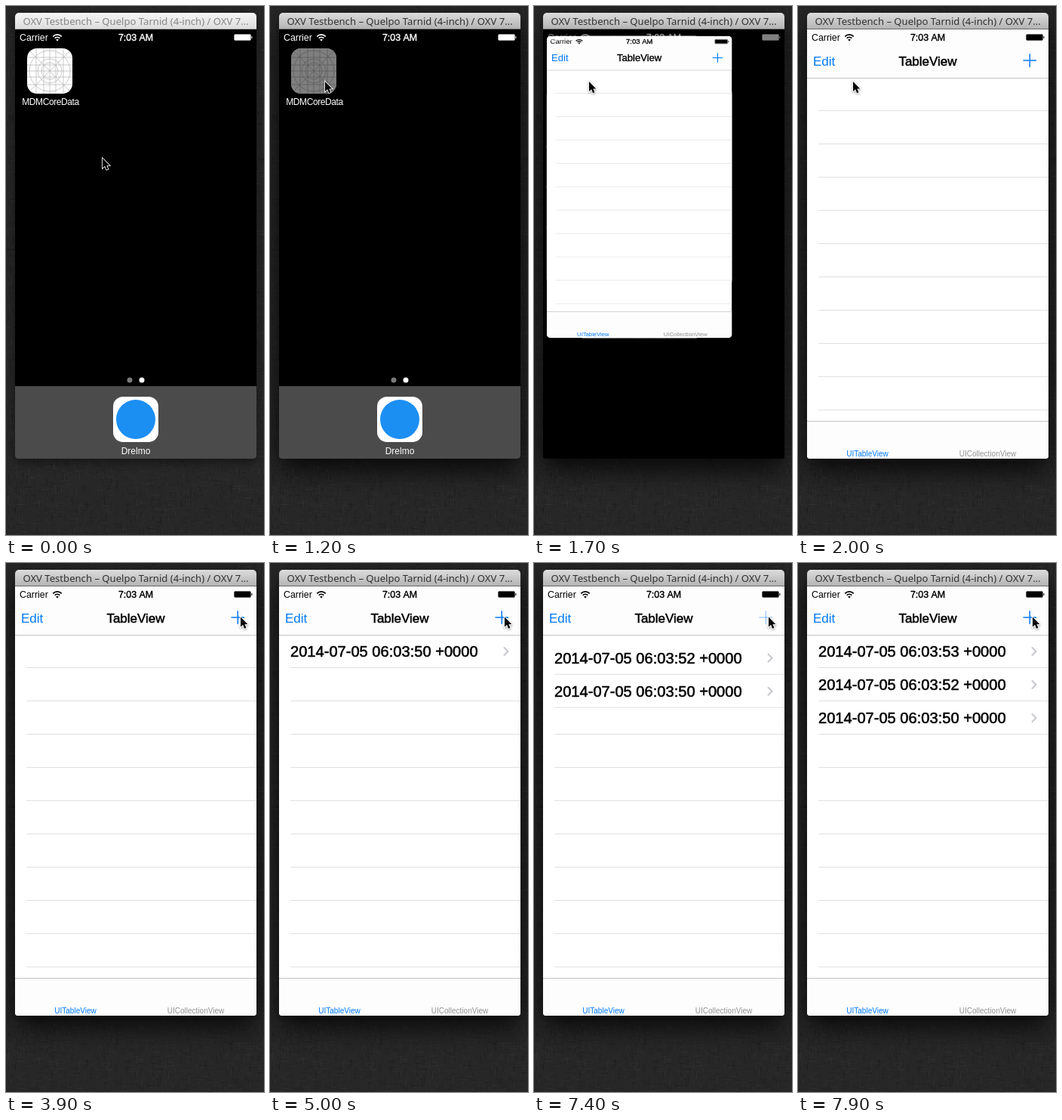
These frames come from a looping animation (342 px wide and 700 px high, 8 s). An HTML page with a canvas:

```html
<!DOCTYPE html>
<html lang="en">
<head>
<meta charset="utf-8">
<title>Table view demo</title>
<style>
html, body { margin: 0; width: 100%; height: 100%; overflow: hidden; background: #262626; }
canvas { display: block; }
</style>
</head>
<body>
<canvas id="stage" width="342" height="700"></canvas>
<script>
const LOOP = 8000, STEP = 100;
const SCREEN = { x: 12, y: 31, w: 320, h: 568 };
const ICON = { x: 28, y: 56, w: 60, h: 60 };
const ACTIVATE = 1200;
const TAPS = [
  { t: 4100, sec: 50 },
  { t: 5500, sec: 52 },
  { t: 7100, sec: 53 }
];
const BLUE = '#007aff', RULE = '#e0e0e0';
const SANS = '"Liberation Sans", Arial, sans-serif';

const ctx = document.getElementById('stage').getContext('2d');

const lerp = (a, b, p) => a + (b - a) * p;
const ramp = (t, from, to) => Math.min(1, Math.max(0, (t - from) / (to - from)));
const smooth = p => p * p * (3 - 2 * p);
const easeInOut = p => p < 0.5 ? 4 * p ** 3 : 1 - 4 * (1 - p) ** 3;

function rect(x, y, w, h, color) {
  ctx.fillStyle = color;
  ctx.fillRect(x, y, w, h);
}

function roundPath(x, y, w, h, r) {
  ctx.beginPath();
  ctx.roundRect(x, y, w, h, r);
}

function roundRect(x, y, w, h, r, color) {
  roundPath(x, y, w, h, r);
  ctx.fillStyle = color;
  ctx.fill();
}

function disc(x, y, r, color) {
  ctx.fillStyle = color;
  ctx.beginPath();
  ctx.arc(x, y, r, 0, Math.PI * 2);
  ctx.fill();
}

// weight adds a thin outline, for a medium cut of the regular face
function text(str, x, y, size, color, { align = 'left', weight = 0, font = SANS, track = 0 } = {}) {
  ctx.font = `${size}px ${font}`;
  ctx.textAlign = align;
  ctx.letterSpacing = track + 'px';
  ctx.fillStyle = color;
  ctx.fillText(str, x, y);
  if (weight) {
    ctx.strokeStyle = color;
    ctx.lineWidth = weight;
    ctx.lineJoin = 'round';
    ctx.strokeText(str, x, y);
  }
}

function withAlpha(alpha, draw) {
  if (alpha <= 0) return;
  ctx.save();
  ctx.globalAlpha *= alpha;
  draw();
  ctx.restore();
}

function makeLinen() {
  const c = document.createElement('canvas');
  c.width = 342;
  c.height = 700;
  const g = c.getContext('2d');
  let seed = 7;
  const rnd = () => (seed = (seed * 16807) % 2147483647) / 2147483647;
  g.fillStyle = '#272727';
  g.fillRect(0, 0, 342, 700);
  for (let i = 0; i < 9000; i++) {
    const len = 2 + rnd() * 9, upright = rnd() < 0.5;
    g.fillStyle = rnd() < 0.55 ? 'rgba(0,0,0,.11)' : 'rgba(255,255,255,.025)';
    g.fillRect(Math.floor(rnd() * 342), Math.floor(rnd() * 700), upright ? 1 : len, upright ? len : 1);
  }
  return c;
}
const linen = makeLinen();

function drawWindow(active) {
  ctx.drawImage(linen, 0, 0);
  ctx.save();
  ctx.shadowColor = active ? 'rgba(0,0,0,.85)' : 'rgba(0,0,0,.5)';
  ctx.shadowBlur = active ? 36 : 16;
  ctx.shadowOffsetY = active ? 14 : 5;
  roundRect(12, 9, 320, 590, [5, 5, 4, 4], '#000');
  ctx.restore();

  const grad = ctx.createLinearGradient(0, 9, 0, 31);
  grad.addColorStop(0, active ? '#dcdcdc' : '#f6f6f6');
  grad.addColorStop(1, active ? '#b2b2b2' : '#dcdcdc');
  roundRect(12, 9, 320, 22, [5, 5, 0, 0], grad);
  rect(12, 30, 320, 1, active ? '#6a6a6a' : '#a0a0a0');
  text('OXV Testbench – Quelpo Tarnid (4-inch) / OXV 7…', 172, 25, 13.1,
    active ? '#303030' : '#858585',
    { align: 'center', font: '"Noto Sans", "Open Sans", sans-serif' });
}

function drawStatus(color) {
  text('Carrier', 18, 45.5, 12.4, color);
  text('7:03 AM', 172, 45.5, 12.4, color, { align: 'center', weight: 0.4 });
  ctx.strokeStyle = color;
  ctx.lineWidth = 1.8;
  for (const r of [4.7, 8.1]) {
    ctx.beginPath();
    ctx.arc(68, 46, r, -Math.PI * 0.75, -Math.PI * 0.25);
    ctx.stroke();
  }
  ctx.fillStyle = color;
  ctx.beginPath();
  ctx.moveTo(68, 46.5);
  ctx.arc(68, 46, 2.2, -Math.PI * 0.8, -Math.PI * 0.2);
  ctx.fill();
  rect(303, 38, 21, 7, color);
  withAlpha(0.6, () => {
    ctx.lineWidth = 1;
    roundPath(302.5, 37.5, 22, 8, 1.5);
    ctx.stroke();
    rect(325, 40, 1.6, 3, color);
  });
}

function drawGridIcon() {
  const { x, y, w } = ICON, cx = x + w / 2, cy = y + w / 2;
  ctx.save();
  roundPath(x, y, w, w, 13);
  ctx.clip();
  rect(x, y, w, w, '#fff');
  ctx.strokeStyle = '#b4b4b4';
  ctx.lineWidth = 0.7;
  ctx.beginPath();
  for (const d of [-18, -8, 0, 8, 18]) {
    ctx.moveTo(cx + d, y); ctx.lineTo(cx + d, y + w);
    ctx.moveTo(x, cy + d); ctx.lineTo(x + w, cy + d);
  }
  ctx.moveTo(x, y); ctx.lineTo(x + w, y + w);
  ctx.moveTo(x + w, y); ctx.lineTo(x, y + w);
  for (const r of [11, 16, 27]) {
    ctx.moveTo(cx + r, cy);
    ctx.arc(cx, cy, r, 0, Math.PI * 2);
  }
  ctx.stroke();
  ctx.restore();
}

// Draws content laid out in box "from" stretched over box "to"
function mapped(from, to, draw) {
  ctx.save();
  ctx.translate(to.x, to.y);
  ctx.scale(to.w / from.w, to.h / from.h);
  ctx.translate(-from.x, -from.y);
  draw();
  ctx.restore();
}

function drawHome(t) {
  rect(12, 31, 320, 568, '#000');
  withAlpha(1 - ramp(t, 1200, 1450), () => {
    disc(164, 495, 3.5, '#7a7a7a');
    disc(180, 495, 3.5, '#fff');
    rect(12, 503, 320, 96, '#4b4b4b');
    roundRect(142, 517, 60, 60, 13, '#fff');
    disc(172, 547, 26, '#1c8ff3');
    text('Drelmo', 172, 593, 12, '#fff', { align: 'center' });
  });

  const px = easeInOut(ramp(t, 1275, 2000)), py = px ** 1.2;
  const box = {
    x: lerp(ICON.x, SCREEN.x, px), y: lerp(ICON.y, SCREEN.y, py),
    w: lerp(ICON.w, SCREEN.w, px), h: lerp(ICON.h, SCREEN.h, py)
  };
  const zoom = box.w / ICON.w;

  withAlpha(1 - ramp(t, 1400, 1700), () => {
    ctx.translate(box.x + box.w / 2 + zoom, box.y + box.h + 14.7);
    ctx.scale(zoom, zoom);
    text('MDMCoreData', 0, 0, 12, '#fff', { align: 'center', track: -0.4 });
  });

  mapped(ICON, box, () => {
    drawGridIcon();
    if (t >= ACTIVATE) roundRect(ICON.x, ICON.y, 60, 60, 13, 'rgba(0,0,0,.5)');
  });
  // The app sits slightly inside the icon, whose dark rim shows around it
  const inset = lerp(1.6, 0, px);
  const inner = { x: box.x + inset, y: box.y + inset, w: box.w - 2 * inset, h: box.h - 2 * inset };
  withAlpha(ramp(t, 1400, 1630), () => {
    roundPath(inner.x, inner.y, inner.w, inner.h, lerp(18, 0, px));
    ctx.clip();
    mapped(SCREEN, inner, () => drawApp(t));
  });
  withAlpha(1 - ramp(t, 1600, 1800), () => drawStatus('#fff'));
}

function plusAlpha(t) {
  const tap = TAPS.filter(p => t >= p.t).pop();
  return tap ? lerp(0.2, 1, ramp(t, tap.t + 200, tap.t + 800)) : 1;
}

function drawRow(sec, y) {
  rect(12, y + 1, 320, 43, '#fff');
  rect(27, y + 43, 305, 1, RULE);
  text(`2014-07-05 06:03:${sec} +0000`, 27, y + 29, 20.1, '#000', { weight: 0.55 });
  ctx.strokeStyle = '#c7c7cc';
  ctx.lineWidth = 2;
  ctx.lineJoin = 'miter';
  ctx.beginPath();
  ctx.moveTo(310, y + 16.5);
  ctx.lineTo(315.5, y + 22);
  ctx.lineTo(310, y + 27.5);
  ctx.stroke();
}

// Older rows slide down over the newest, which fades in beneath them
function drawRows(t) {
  let pushed = 0;
  for (const tap of [...TAPS].reverse()) {
    const shown = smooth(ramp(t, tap.t + 200, tap.t + 550));
    withAlpha(shown, () => drawRow(tap.sec, 95 + pushed * 44));
    pushed += shown;
  }
}

function drawApp(t) {
  rect(12, 31, 320, 568, '#fff');
  for (let i = 0; i < 10; i++) rect(27, 138 + i * 44, 305, 1, RULE);
  drawRows(t);

  rect(12, 31, 320, 64, '#fdfdfd');
  rect(12, 95, 320, 1, '#c4c4c4');
  drawStatus('#000');
  text('Edit', 20, 79, 17, BLUE);
  text('TableView', 172, 79, 17, '#000', { align: 'center', weight: 0.5 });
  withAlpha(plusAlpha(t), () => {
    rect(298.5, 71.3, 17.5, 1.5, BLUE);
    rect(306.5, 63.3, 1.5, 17.5, BLUE);
  });

  rect(12, 549, 320, 50, '#fdfdfd');
  rect(12, 549, 320, 1, '#c4c4c4');
  text('UITableView', 92, 595.5, 10, BLUE, { align: 'center' });
  text('UICollectionView', 251.5, 595.5, 10, '#929292', { align: 'center' });
}

function drawCursor(t) {
  const a = smooth(ramp(t, 0, 650)), b = smooth(ramp(t, 3100, 3900));
  ctx.save();
  ctx.translate(lerp(lerp(128, 73, a), 311, b), lerp(lerp(201.5, 100, a), 71.5, b));
  ctx.scale(0.93, 0.93);
  ctx.beginPath();
  [[0, 0], [0, 14], [3.3, 11], [5.6, 16.4], [8, 15.4], [5.8, 10.2], [10, 10.2]]
    .forEach(([x, y]) => ctx.lineTo(x, y));
  ctx.closePath();
  ctx.shadowColor = 'rgba(0,0,0,.4)';
  ctx.shadowBlur = 3;
  ctx.shadowOffsetY = 1;
  ctx.strokeStyle = '#fff';
  ctx.lineWidth = 1.8;
  ctx.lineJoin = 'miter';
  ctx.stroke();
  ctx.shadowColor = 'transparent';
  ctx.fillStyle = '#000';
  ctx.fill();
  ctx.restore();
}

function render(t) {
  drawWindow(t >= ACTIVATE);
  ctx.save();
  roundPath(12, 31, 320, 568, [0, 0, 4, 4]);
  ctx.clip();
  if (t < 2000) drawHome(t);
  else drawApp(t);
  ctx.restore();
  drawCursor(t);
}

const start = performance.now();
function tick() {
  const t = (performance.now() - start) % LOOP;
  render(Math.floor(t / STEP) * STEP);
  requestAnimationFrame(tick);
}
tick();
</script>
</body>
</html>
```
